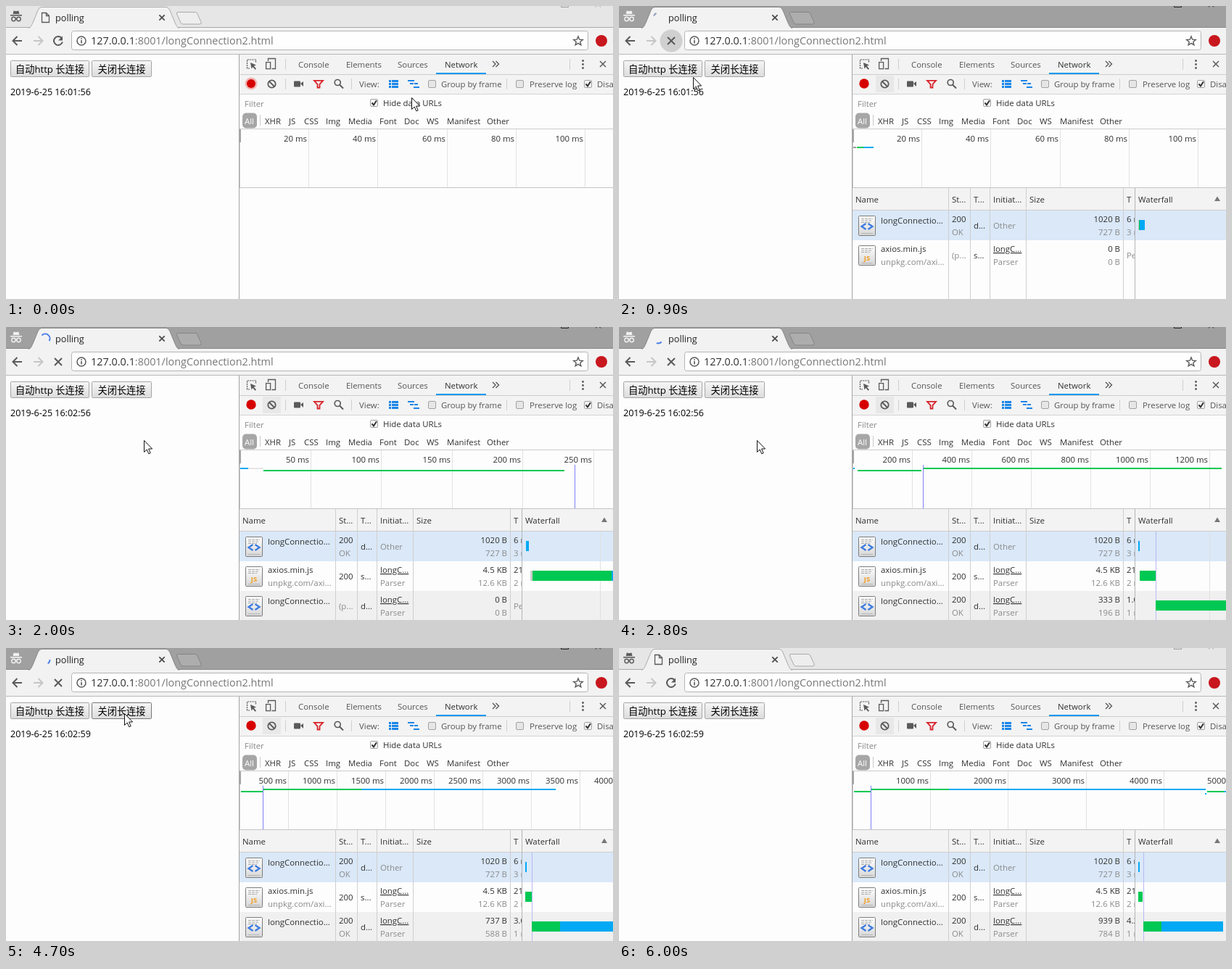
These frames come from a looping animation (837 by 404 pixels, 6100 ms). An HTML page:

```html
<!DOCTYPE html>
<html lang="zh">
<head>
<meta charset="utf-8">
<title>polling</title>
<style>
html, body { margin: 0; width: 100%; height: 100%; overflow: hidden; background: #fdfdfd; }
svg { display: block; width: 837px; height: 404px; }
text { font: 11.4px "Open Sans", "Noto Sans", sans-serif; fill: #303030; white-space: pre; }
.dim { fill: #8a8a8a; }
.end { text-anchor: end; }
.tab { fill: #555; }
.link { text-decoration: underline; }
.url { font-size: 14.4px; }
.title { font-size: 12.7px; fill: #222; }
.date { font-size: 12.5px; fill: #000; }
.btn { font: 13.2px "Open Sans", "Noto Sans CJK SC", "Noto Sans CJK", sans-serif; fill: #000; text-anchor: middle; }
.js { font: bold 9.5px "Open Sans", sans-serif; fill: #f39c1f; text-anchor: middle; }
</style>
</head>
<body>
<svg viewBox="0 0 837 404">
  <defs>
    <linearGradient id="face" x2="0" y2="1"><stop stop-color="#f6f6f6"/><stop offset="1" stop-color="#dcdcdc"/></linearGradient>
    <linearGradient id="paper" x2="0" y2="1"><stop stop-color="#fff"/><stop offset="1" stop-color="#d6d6d6"/></linearGradient>
  </defs>
  <g id="base"></g>
  <g id="live"></g>
</svg>
<script>
const GREEN = '#00c853', BLUE = '#03a9f4', INK = '#5a5a5a';
const base = document.getElementById('base'), live = document.getElementById('live');

const esc = s => String(s).replace(/&/g, '&amp;').replace(/</g, '&lt;');
const text = (x, y, s, cls = '') => `<text x="${x}" y="${y}" class="${cls}">${esc(s)}</text>`;
const rect = (x, y, w, h, fill, more = '') => `<rect x="${x}" y="${y}" width="${w}" height="${h}" fill="${fill}" ${more}/>`;
const line = (d, color, w = 1, more = '') => `<path d="${d}" fill="none" stroke="${color}" stroke-width="${w}" ${more}/>`;
const fill = (d, color) => `<path d="${d}" fill="${color}"/>`;
const ring = (x, y, r, color, w) => `<circle cx="${x}" cy="${y}" r="${r}" fill="none" stroke="${color}" stroke-width="${w}"/>`;
const dot = (x, y, r, color) => `<circle cx="${x}" cy="${y}" r="${r}" fill="${color}"/>`;
const vert = (x, y, h, color) => rect(x, y, 1, h, color);
const cross = (x, y, r, color, w) => line(`M${x - r} ${y - r}l${2 * r} ${2 * r}m0 ${-2 * r}l${-2 * r} ${2 * r}`, color, w);

const check = (x, y, on) => rect(x + .5, y + .5, 10, 10, on ? '#f4f4f4' : '#e6e6e6', 'rx="1.5" stroke="#a2a2a2"') +
  (on ? line(`M${x + 2.5} ${y + 5.5}l2.5 2.8l4-6`, '#333', 2) : '');

function toolbar() {
  let star = 'M';
  for (let i = 0; i < 10; i++) {
    const a = Math.PI * (i / 5 - .5), r = i % 2 ? 2.9 : 6.6;
    star += `${789 + r * Math.cos(a)} ${48.5 + r * Math.sin(a)} `;
  }
  return rect(0, 30, 837, 36, '#f2f2f2') + rect(0, 66, 837, 1, '#b8b8b8') +
    line('M22 48H10M15.5 42L9.5 48L15.5 54', INK, 2) +
    line('M38 48H50M44.5 42L50.5 48L44.5 54', '#c6c6c6', 2) +
    rect(90.5, 34.5, 712, 26, '#fefefe', 'rx="3" stroke="#b5b5b5"') +
    ring(104, 48, 6, INK, 1.5) + rect(103.2, 47, 1.6, 4.5, INK) + rect(103.2, 44.3, 1.6, 1.6, INK) +
    `<text x="117" y="53" class="url" fill="#222">127.0.0.1<tspan fill="#777">:8001/longConnection2.html</tspan></text>` +
    line(star + 'Z', INK, 1.4) + dot(821, 48, 8, '#c8171e');
}

function devtools() {
  let s = rect(322, 67, 515, 54, '#f3f3f3') + vert(321, 67, 337, '#a3a3a3') +
    rect(322, 94, 515, 1, '#cdcdcd') + rect(322, 121, 515, 1, '#d4d4d4');
  // inspect and device
  s += line('M336 86h-3.5v-12h12v4', INK, 1.2, 'stroke-dasharray="2.2 1"') + fill('M337 78l8 3.5l-3.2 1.2l3.2 3.8l-1.5 1.3l-3.2-3.9l-1.8 2.6z', INK) +
    line('M361.5 76v-3.5h10v14h-5', INK, 1.3) + rect(358.6, 77.6, 6, 9, '#f3f3f3', `stroke="${INK}" stroke-width="1.3"`);
  [[403, 'Console'], [469, 'Elements'], [540, 'Sources']].forEach(([x, n]) => s += text(x, 85, n, 'tab'));
  s += text(605, 85, 'Network') + rect(593, 92, 69, 2, '#0d9af0') +
    line('M671 76l4 4l-4 4M675.5 76l4 4l-4 4', INK, 1.4) +
    [75.5, 80.5, 85.5].map(y => dot(795.5, y, 1.4, INK)).join('') + cross(823, 80, 4, INK, 1.5);
  s += [[385, 73], [777, 73], [385, 100], [476, 100], [690, 100]].map(([x, y]) => vert(x, y, 15, '#cfcfcf')).join('');
  // camera, funnel, search
  s += rect(397, 103.5, 9, 8, INK, 'rx="1"') + fill('M406 107l4-3v7z', INK) +
    line('M425 102.8h12l-4.5 5v4.7h-3v-4.7z', '#d8232a', 1.8) +
    ring(457.2, 105.5, 4, INK, 1.7) + line('M460 108.5l5 5', INK, 2);
  s += text(487, 112, 'View:', 'tab');
  for (let i = 0; i < 3; i++) s += rect(528, 102 + i * 4, 3, 3, '#1a86e8') + rect(532, 102 + i * 4, 9, 3, '#1a86e8');
  s += rect(554, 102, 9, 2, '#1a86e8') + rect(557, 106, 5, 2, '#1a86e8') + rect(563, 106, 5, 2, '#1a86e8') + rect(562, 111, 8, 2, '#1a86e8');
  s += check(582, 102) + text(600, 112, 'Group by frame', 'tab') + check(703, 102) + text(722, 112, 'Preserve log', 'tab') +
    check(797, 102, 1) + text(815, 112, 'Disable cache', 'tab');
  s += text(329, 139, 'Filter', 'dim') + check(502, 128, 1) + text(520, 138, 'Hide data URLs');
  s += rect(326, 147.5, 20, 21, '#a6a6a6', 'rx="5"') + `<text x="329" y="163" style="fill:#fff">All</text>` + vert(350, 150, 15, '#ccc');
  [[357, 'XHR'], [390, 'JS'], [411, 'CSS'], [441, 'Img'], [472, 'Media'], [515, 'Font'], [549, 'Doc'], [580, 'WS'], [608, 'Manifest'], [663, 'Other']]
    .forEach(([x, n]) => s += text(x, 163, n));
  return s + rect(322, 169, 515, 1, '#ccc') + rect(322, 250, 515, 1, '#c4c4c4');
}

// overview bars: [from, to, y, color]; fall: [row, from, to, color]
const TOP = 194, LOW = 197;
const nets = [
  { at: 0, step: 95.2, ms: 20, bars: [] },
  { at: 900, step: 95.2, ms: 20, bars: [[323, 327, TOP, '#9c9c9c'], [328, 337, TOP, GREEN], [337, 351, TOP, BLUE]],
    fall: [[0, 716, 718, '#c8c8c8'], [0, 717, 719, GREEN], [0, 718, 725, BLUE]] },
  { at: 1200, step: 97.5, ms: 50, bars: [[323, 334, TOP, BLUE], [334, 355, TOP, '#e6e6e6'], [355, 770, LOW, GREEN]], mark: 784, grid: 819, js: 1,
    fall: [[0, 717, 721, BLUE], [1, 723, 726, '#ccc'], [1, 726, 835, GREEN], [1, 835, 837, BLUE]] },
  { at: 2100, step: 82, ms: 200, bars: [[323, 325, TOP, BLUE], [329, 417, LOW, GREEN], [419, 831, TOP, GREEN]], mark: 419, grid: 814, js: 1,
    fall: [[0, 716, 718, BLUE], [1, 718, 740, GREEN], [2, 740, 837, GREEN]], load: 740, size: ['333 B', '196 B', '1.0 s'] },
  { at: 3100, step: 105.2, ms: 500, bars: [[323, 324, TOP, BLUE], [326, 371, LOW, GREEN], [372, 582, TOP, GREEN], [582, 793, TOP, BLUE]], mark: 372, grid: 825, js: 1,
    fall: [[0, 716, 718, BLUE], [1, 717, 729, GREEN], [2, 729, 784, GREEN], [2, 784, 837, BLUE]], load: 729, size: ['535 B', '392 B', '2.0 s'] },
  { at: 4100, step: 67, ms: 500, bars: [[324, 354, LOW, GREEN], [354, 490, TOP, GREEN], [490, 758, TOP, BLUE]], mark: 354, js: 1,
    fall: [[0, 716, 718, BLUE], [1, 716, 725, GREEN], [2, 725, 764, GREEN], [2, 764, 837, BLUE]], load: 725, size: ['737 B', '588 B', '3.0 s'] },
  { at: 4800, step: 67, ms: 500, bars: [[324, 354, LOW, GREEN], [354, 490, TOP, GREEN], [490, 818, TOP, BLUE]], mark: 354, js: 1,
    fall: [[0, 716, 718, BLUE], [1, 716, 725, GREEN], [2, 725, 764, GREEN], [2, 764, 837, BLUE]], load: 725, size: ['939 B', '784 B', '4.0 s'] },
  { at: 5200, step: 107.2, ms: 1000, bars: [[324, 347, LOW, GREEN], [347, 455, TOP, GREEN], [455, 809, TOP, BLUE], [808, 810, 200, BLUE], [811, 834, LOW, GREEN], [834, 837, LOW, BLUE]],
    mark: 347, js: 1,
    fall: [[0, 716, 718, BLUE], [1, 716, 722, GREEN], [2, 723, 748, GREEN], [2, 748, 833, BLUE]], load: 723, size: ['939 B', '784 B', '4.3 s'] }
];

// [time, x, y]; the pointer is hidden after the last stop
const path = [[0, 559, 126], [100, 366, 106], [200, 260, 230], [300, 113, 221], [400, 70, 136], [500, 71, 48],
  [900, 102, 98], [1100, 152, 150], [1200, 175, 155], [1300, 190, 156], [4400, 175, 152], [4500, 163, 90], [5100, 166, 120], [5200, -50, 0]];
const dates = [[0, '16:01:56'], [1200, ''], [2000, '16:02:56'], [3000, '16:02:57'], [4000, '16:02:58'], [4600, '16:02:59']];
const last = (list, t, key = 0) => list.filter(e => e[key] <= t).pop();

function frame(t) {
  const dark = t >= 800 && t < 6000, busy = t >= 800 && t < 5200;
  const bar = dark ? '#a0a0a0' : '#e6e6e6', edge = dark ? '#858585' : '#a9a9a9', icon = dark ? '#f2f2f2' : '#5c5c5c';
  let s = rect(0, 0, 837, 30, bar) + rect(0, 29, 837, 1, edge);
  s += fill('M9.5 11l1.2-4.5l3.3 .8l3.3-.8l1.2 4.5z', icon) + rect(6, 12, 16, 1.6, icon) +
    ring(10.5, 18, 2.7, icon, 1.4) + ring(17.5, 18, 2.7, icon, 1.4) + line('M13 17.5q1-.8 2 0', icon, 1.2);
  s += `<path d="M31 30.5C35 29 35 27 37 23L44 6Q46 1.5 49 1.5H221Q224 1.5 226 6L233 23C235 27 235 29 239 30.5" fill="#f2f2f2" stroke="${edge}"/>`;
  s += `<path d="M237 8.5H261Q263 8.5 264 11L269 22Q270 25 267 25H244Q242 25 241 23L235.5 11Q235 8.5 237 8.5Z" fill="${dark ? '#adadad' : '#eee'}" stroke="${edge}"/>`;
  s += line('M765.5 0V1.5H775.5V0M813 1.5l1.5-1.5M820 1.5l-1.5-1.5', dark ? '#222' : '#999', 1);
  s += text(68, 20.5, 'polling', 'title') + cross(215, 16, 3.7, '#4a4a4a', 1.7);
  return s + (busy ? spinner(t) : line('M49.5 9.5h6l4 4v9h-10zM55.5 9.5v4h4', INK, 1.3)) + reload(t, busy);
}

function spinner(t) {
  const wait = t < 1200, k = (t - 1500) / 2200;
  const sweep = wait ? 45 : 150 + 100 * Math.cos(2 * Math.PI * k);
  const mid = wait ? 225 - (t - 900) * .36 : 225 + 360 * k;
  const at = a => `${54 + 6.5 * Math.cos(a * Math.PI / 180)} ${16 + 6.5 * Math.sin(a * Math.PI / 180)}`;
  return line(`M${at(mid - sweep / 2)}A6.5 6.5 0 ${sweep > 180 ? 1 : 0} 1 ${at(mid + sweep / 2)}`, wait ? '#8ea0c4' : '#4a7fe8', 2);
}

function reload(t, busy) {
  const hover = t >= 500 && t < 1100 ? dot(72, 48, 15.5, t < 800 ? '#dedede' : '#d0d0d0') : '';
  return hover + (busy ? cross(72, 48, 5, INK, 2) :
    line('M76.5 44A6 6 0 1 0 77.8 49.5', INK, 2) + fill('M78 41.5v6h-6z', INK));
}

function page(t, x, y) {
  const over = (a, b) => x >= a && x < b && y >= 75 && y < 98;
  const button = (a, w, label) => rect(a + .5, 75.5, w - 1, 22, 'url(#face)', `rx="1" stroke="${over(a, a + w) ? '#777' : '#a5a5a5'}"`) +
    text(a + w / 2, 92, label, 'btn');
  const time = last(dates, t)[1];
  return button(6, 109, '自动http 长连接') + button(118, 83, '关闭长连接') + (time ? text(6, 122.5, '2019-6-25 ' + time, 'date') : '');
}

function overview(n) {
  let s = rect(322, 170, 515, 80, '#fdfdfd') + rect(322, 170, 1, 80, '#ccc');
  for (let i = 1; 322 + i * n.step < 880; i++) {
    const x = Math.round(322 + i * n.step);
    s += vert(x, 170, 80, '#e2e2e2') + text(x - 2, 187, i * n.ms + ' ms', 'end');
  }
  s += rect(322, 170, 2, 18, '#a5a5a5');
  for (const [a, b, y, c] of n.bars) s += rect(a, y, b - a, 2, c);
  return s + (n.mark ? vert(n.mark, 190, 60, '#8080f8') : '');
}

function docIcon(y, js) {
  let s = rect(330.5, y + .5, 23, 27, 'url(#paper)', 'rx="1" stroke="#7c7c7c"');
  for (let i = 0; i < 3; i++) s += line(`M334 ${y + 4.5 + i * 2.5}h${16 - i * 2}`, '#a8a8a8', 1, 'stroke-dasharray="4 1"');
  s += line(`M334 ${y + 24.5}h16`, '#b5b5b5');
  return s + (js ? text(342, y + 20.5, 'JS', 'js') :
    line(`M340.5 ${y + 11}l-6 4l6 4M343.5 ${y + 11}l6 4l-6 4`, '#3d7be0', 2.3));
}

function row(i, r) {
  const y = 282 + 41 * i, one = y + 16, mid = y + 25, two = y + 34, back = ['#dae8f8', '#fdfdfd', '#f0f0f0'][i];
  let s = rect(322, y, 515, 41, back) + docIcon(y + 7, i === 1);
  s += i === 1 ? text(361, one, 'axios.min.js') + text(361, two, 'unpkg.com/axi...', 'dim') : text(361, y + 18, 'longConnectio...');
  s += r.wait ? text(459, mid, '(p...', 'dim') : i === 1 ? text(459, mid, '200') : text(459, one, '200') + text(459, two, 'OK', 'dim');
  s += text(489, mid, i === 1 ? 's...' : 'd...');
  s += i ? text(516, one, 'longC...', 'link') + text(516, two, 'Parser', 'dim') : text(516, mid, 'Other', 'dim');
  s += text(691, one, r.size, 'end') + text(691, two, r.body, 'end dim');
  s += r.wait ? text(700, mid, 'Pending', 'dim') : text(700, one, r.time) + text(700, two, r.delay, 'dim');
  return s + rect(711, y, 126, 41, back);
}

function table(n) {
  if (!n.fall) return '';
  const wait = { wait: 1, size: '0 B', body: '0 B' };
  const rows = [{ size: '1020 B', body: '727 B', time: '6 ms', delay: '3 ms' },
    n.js ? { size: '4.5 KB', body: '12.6 KB', time: '218 ms', delay: '2 ms' } : wait];
  if (n.js) rows.push(n.size ? { size: n.size[0], body: n.size[1], time: n.size[2], delay: '1 ms' } : wait);
  let s = rect(322, 251, 515, 30, '#f3f3f3') + rows.map((r, i) => row(i, r)).join('') + rect(322, 281, 515, 1, '#cdcdcd');
  [[326, 'Name'], [459, 'St...'], [489, 'T...'], [516, 'Initiat...'], [566, 'Size'], [700, 'T'], [716, 'Waterfall']]
    .forEach(([x, h]) => s += text(x, 271, h));
  s += fill('M821 269h8l-4-6.5z', '#777');
  for (const x of [454, 484, 511, 561, 695, 711]) s += vert(x, 251, 153, x === 711 ? '#b5b5b5' : '#cfcfcf');
  if (n.grid) s += vert(n.grid, 282, 122, '#e0e0e0');
  if (n.load) s += vert(n.load, 282, 122, '#b9b9f4');
  for (const [i, a, b, c] of n.fall) s += rect(a, 295 + 41 * i, b - a, 14, c);
  return s;
}

function record(t) {
  const on = t >= 100;
  return (on ? rect(354, 96, 25, 23, '#e8e8e8') : dot(338, 107, 8.5, '#f3b4b4')) + dot(338, 107, on ? 6.7 : 6, '#d60000') +
    ring(366.5, 107.5, 5.2, INK, 1.8) + line('M363 104l7 7', INK, 1.8);
}

const pointer = (x, y) => `<path d="M${x + .5} ${y + .5}v16l3.7-3.5l2.6 5.8l2.4-1l-2.6-5.8h5z" fill="#fff" stroke="#111"/>`;

function draw(t) {
  const n = last(nets, t, 'at'), [, x, y] = last(path, t);
  live.innerHTML = frame(t) + page(t, x, y) + record(t) + overview(n) + table(n) + pointer(x, y);
}

base.innerHTML = rect(0, 0, 837, 404, '#fdfdfd') + toolbar() + devtools();
const start = performance.now();
let shown = -1;
function tick() {
  const t = Math.floor((performance.now() - start) % 6100 / 100) * 100;
  if (t !== shown) draw(shown = t);
  requestAnimationFrame(tick);
}
tick();
</script>
</body>
</html>
```
